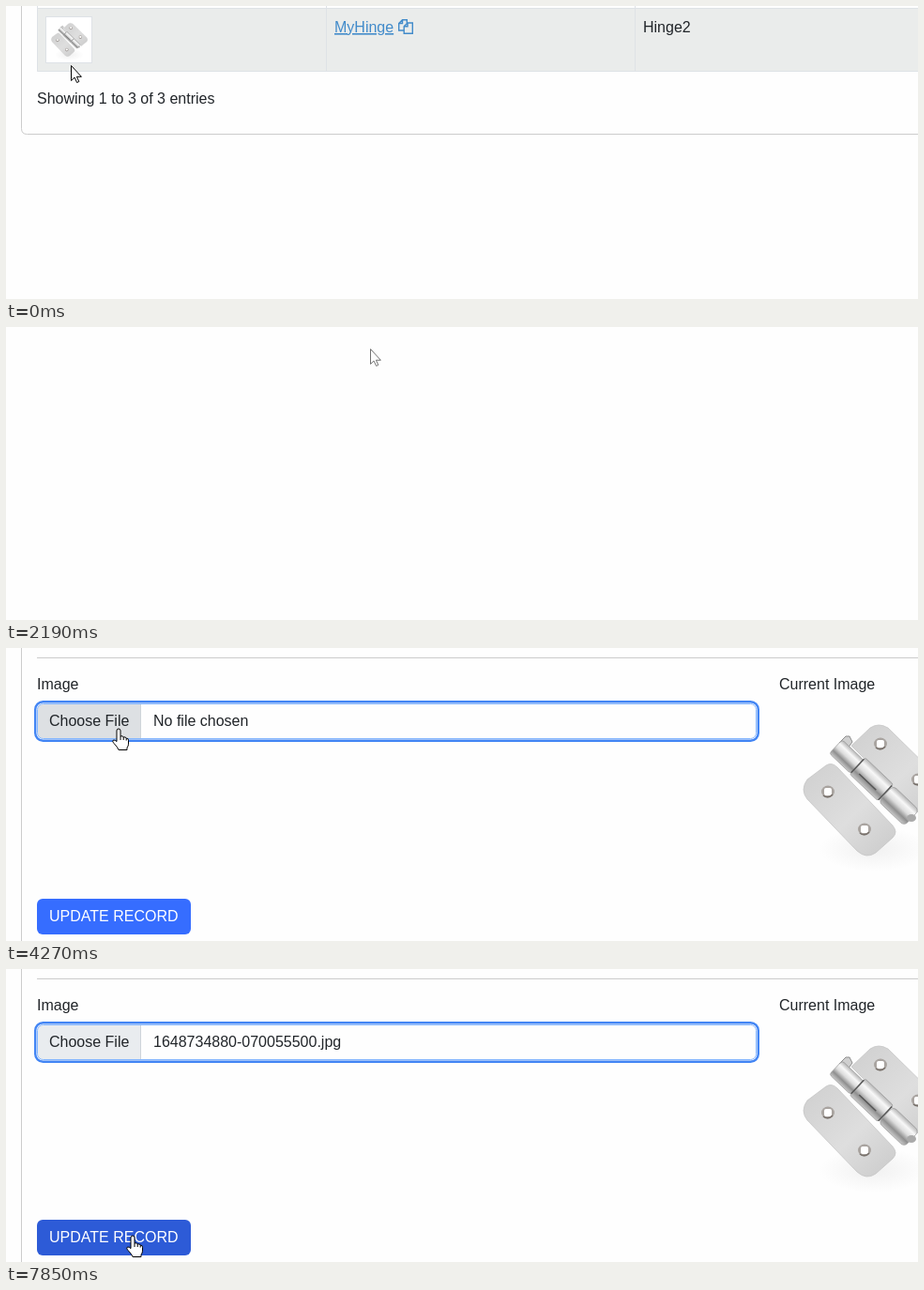
An HTML page for the animation above (7990 ms loop, 972 by 312 pixels).

```html
<!DOCTYPE html>
<html lang="en">
<head>
<meta charset="utf-8">
<title>Update image record</title>
<style>
html, body { margin: 0; width: 100%; height: 100%; overflow: hidden; background: #fefefe; }
svg { display: block; }
text { font: 16px "Liberation Sans", Arial, sans-serif; fill: #212529; }
.line { fill: none; stroke: #dee2e6; }
.card { fill: none; stroke: #ccc; }
.icon { fill: #eaeceb; stroke: #428bca; stroke-width: 1.4; }
.pointer { fill: #fff; stroke: #000; stroke-linejoin: round; }
</style>
</head>
<body>
<svg width="972" height="312" viewBox="0 0 972 312">
  <defs>
    <linearGradient id="plate" x2="1" y2="1">
      <stop stop-color="#cfcfcf"/><stop offset=".55" stop-color="#dedede"/><stop offset="1" stop-color="#cacaca"/>
    </linearGradient>
    <linearGradient id="barrel" x2="0" y2="1">
      <stop stop-color="#b5b5b5"/><stop offset=".25" stop-color="#f8f8f8"/><stop offset=".5" stop-color="#dcdcdc"/>
      <stop offset=".75" stop-color="#8f8f8f"/><stop offset="1" stop-color="#c9c9c9"/>
    </linearGradient>
    <radialGradient id="shade"><stop stop-color="#f1f1f1"/><stop offset="1" stop-color="#fefefe"/></radialGradient>
    <g id="hole">
      <ellipse rx="7" ry="6.5" fill="#a9a4a0"/><rect x="-4" y="-4" width="8" height="8" rx="2" fill="#fff"/>
      <path d="M-5 4Q0 8 5 3" fill="none" stroke="#77706a" stroke-width="1.5"/>
    </g>
    <g id="hinge">
      <ellipse cx="925" cy="214" rx="58" ry="24" fill="url(#shade)"/>
      <g fill="url(#plate)" stroke="#c2c2c2" stroke-width=".7">
        <path d="M901 104L921 85Q930 79 940 85L998 142Q1005 152 998 160L975 178Z"/>
        <path d="M854 140L874 125Q880 121 886 127L945 189Q951 196 945 202L927 218Q917 225 907 216L854 161Q846 151 854 140Z"/>
      </g>
      <path d="M888 101L895 94L899 94L902 100L897 107Z" fill="#cfcfcf" stroke="#8d8d8d"/>
      <g transform="translate(888 107) rotate(43.5)" stroke="#9a9a9a" stroke-width=".7" fill="url(#barrel)">
        <rect x="-4" y="-9" width="31" height="20" rx="3"/>
        <rect x="27" y="-12" width="41" height="24" rx="2"/>
        <rect x="69" y="-11" width="38" height="23" rx="5"/>
        <path d="M27-10V10M68-10V11M34 5H59" fill="none" stroke="#555" stroke-width="1.5"/>
      </g>
      <ellipse cx="965" cy="181" rx="5" ry="4" fill="#aaa"/>
      <use href="#hole" x="876" y="153"/><use href="#hole" x="932" y="102"/>
      <use href="#hole" x="915" y="193"/><use href="#hole" x="972" y="140"/>
    </g>
  </defs>
  <rect width="972" height="312" fill="#fefefe"/>

  <g id="list">
    <path class="card" d="M16.5 0V130.5Q16.5 136.5 22.5 136.5H972"/>
    <path fill="#eaeceb" d="M33 2H972V70H33Z"/>
    <path class="line" d="M33.5 0V69.5H972M33 2.5H972M341.5 0V69M670.5 0V69"/>
    <rect class="line" x="42.5" y="11.5" width="49" height="49" style="fill:#fff"/>
    <use href="#hinge" transform="translate(-168.5 -2.7) scale(.255)"/>
    <text x="350" y="28" style="fill:#428bca" text-decoration="underline">MyHinge</text>
    <path class="icon" d="M424 26H418.7V18.5L422.5 14.7H427.3V18M418.7 18.5H422.5V14.7"/>
    <path class="icon" d="M424.2 21.8L428 18H433.3V29.3H424.2ZM424.2 21.8H428V18"/>
    <text x="679" y="28">Hinge2</text>
    <text x="33" y="104">Showing 1 to 3 of 3 entries</text>
  </g>

  <g id="form">
    <path class="card" d="M16.5 0V312M33 10.5H972"/>
    <text x="33" y="44">Image</text>
    <text x="824" y="44">Current Image</text>
    <path id="choose" d="M143 60V96H39Q34 96 34 91V65Q34 60 39 60Z"/>
    <path class="line" d="M143.5 60V96" style="stroke:#ced4da"/>
    <rect id="field" x="33.5" y="59.5" width="766" height="37" rx="6" fill="none"/>
    <rect id="ring" fill="none" stroke="#4285f4"/>
    <text x="46" y="83">Choose File</text>
    <text id="file" x="157" y="83"></text>
    <use href="#hinge"/>
    <rect id="button" x="33" y="267" width="164" height="38" rx="6"/>
    <text x="46" y="291" style="fill:#fff">UPDATE RECORD</text>
  </g>

  <g id="cursor">
    <circle id="click" r="12" cx="-1" fill="#f3e52e" opacity=".78"/>
    <path id="arrow" class="pointer" d="M.5.5v16l3.6-3.4 2.5 5.4 2.2-1-2.4-5.2h5z"/>
    <path id="hand" class="pointer" d="M-2 2a2 2 0 0 1 4 0v6q2.800-1 3.200 1 2.500-.8 3 1.200 2.300-.4 2.300 2v4q0 2-1.500 4v2.300h-9q-1-3-5-7-2.500-3 0-3.500 1.500 0 3 1.600zM2 8v4M5.200 9v3M8.200 10.200v2.300"/>
  </g>
</svg>
<script>
const LOOP = 7990;
const $ = id => document.getElementById(id);
const set = (id, attrs) => {
  for (const name in attrs) $(id).setAttribute(name, attrs[name]);
};
const show = (id, on) => set(id, { visibility: on ? "visible" : "hidden" });
const mix = (a, b, u) => a + (b - a) * u;
const blend = (a, b, u) => `rgb(${a.map((c, i) => Math.round(mix(c, b[i], u)))})`;

// Index of the current step in a run of n evenly spaced changes; -1 before it.
function stepAt(t, start, end, n) {
  const k = Math.floor((t - start + 6) * (n - 1) / (end - start));
  return t < start - 6 ? -1 : Math.min(n - 1, k);
}

const rest = [388, 23];
const moves = [
  { start: 140, end: 900, n: 11, ease: u => u, path: [[60, 64], [34, 65], [89, 66], [52, 64]] },
  { start: 970, end: 1710, n: 11, ease: u => u ** 1.47, path: [[60, 62], [355, 39]] },
  { start: 1780, end: 2190, n: 6, ease: u => u, path: [[375, 30], rest, rest, rest, rest, rest] },
  { start: 3180, end: 3940, n: 11, ease: u => u * u * (3 - 2 * u), path: [[383, 24], [120, 86]] },
  { start: 4820, end: 5030, n: 4, ease: u => u, path: [[119, 68], [107, 8]] },
  { start: 7300, end: 7850, n: 9, ease: u => u, path: [[450, 42], [135, 284]] }
];

function cursorAt(t) {
  const m = moves.filter(m => t >= m.start - 6).pop();
  if (!m) return [69, 63];
  const u = m.ease(stepAt(t, m.start, m.end, m.n) / (m.n - 1)) * (m.path.length - 1);
  const i = Math.min(Math.floor(u), m.path.length - 2);
  return [0, 1].map(axis => Math.round(mix(m.path[i][axis], m.path[i + 1][axis], u - i)));
}

function focusAt(t) {
  if (t >= 6894) return [.4, .7, .9, 1][stepAt(t, 6900, 7100, 4)];
  const k = stepAt(t, 4010, 4480, 8);
  return k < 0 ? 0 : [.3, .65, 1, 1, 1, .6, .3, 0][k];
}

function draw(t) {
  const leave = stepAt(t, 1780, 2190, 6);
  const enter = stepAt(t, 2580, 2710, 2);
  set("list", { opacity: leave < 3 ? 1 : [.6, .25, 0][leave - 3] });
  set("form", { opacity: [0, .5, 1][enter + 1] });

  const focus = focusAt(t);
  const gap = 2.3 * focus;
  set("ring", {
    x: 33.5 - gap, y: 59.5 - gap, width: 766 + 2 * gap, height: 37 + 2 * gap,
    rx: 6 + gap, "stroke-width": 2.4, opacity: focus
  });
  set("field", { stroke: blend([206, 212, 218], [134, 183, 254], focus) });

  const lit = t < 4004 ? 0 : t < 6894 ? 1 : 1 - stepAt(t, 6900, 7100, 4) / 3;
  set("choose", { fill: blend([233, 236, 239], [221, 224, 227], lit) });
  $("file").textContent = t < 6894 ? "No file chosen" : "1648734880-070055500.jpg";

  const hover = Math.max(0, stepAt(t, 7300, 7850, 9) - 6) / 2;
  set("button", { fill: blend([54, 109, 255], [45, 91, 215], hover) });

  const [x, y] = cursorAt(t);
  const overChoose = t > 3174 && t < 4340 && x < 144 && y > 58;
  const hand = (leave >= 0 && leave < 4) || overChoose || hover > 0;
  set("cursor", {
    transform: `translate(${x} ${y})`,
    opacity: t >= 5024 && t < 7294 ? 0 : leave === 5 && enter < 0 ? .55 : 1
  });
  show("arrow", !hand);
  show("hand", hand);
  show("click", leave === 1 || leave === 2 || (t >= 4004 && t < 4210));
}

function tick(now) {
  draw(now % LOOP);
  requestAnimationFrame(tick);
}
draw(0);
requestAnimationFrame(tick);
</script>
</body>
</html>
```
